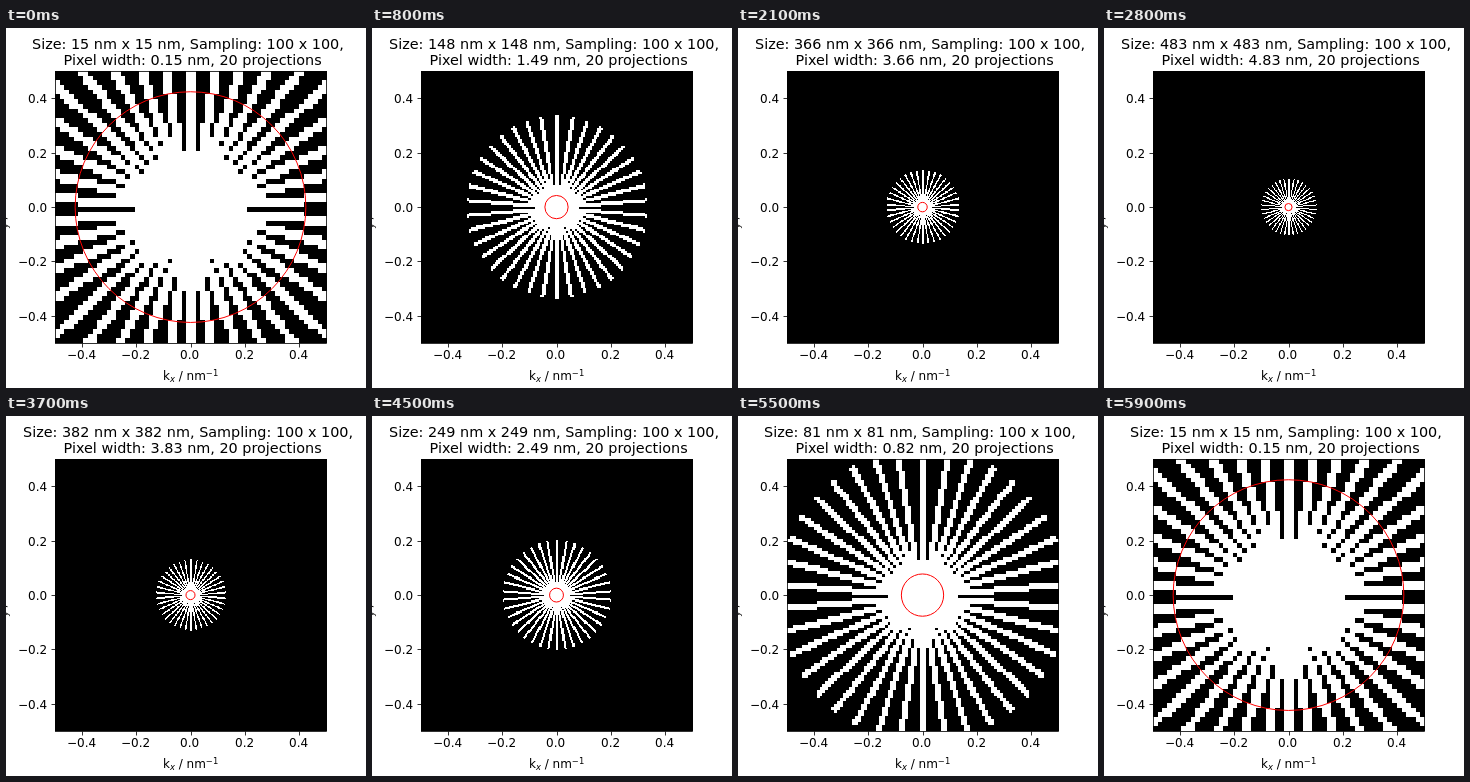
Write an HTML page with a canvas that moves like this. It is 360x360 px and loops after 6 s.

```html
<!DOCTYPE html>
<html lang="en">
<head>
<meta charset="utf-8">
<title>Fourier space coverage</title>
<style>
  html, body { margin: 0; width: 100%; height: 100%; overflow: hidden; background: #fff; }
  canvas { display: block; }
</style>
</head>
<body>
<canvas id="stage" width="360" height="360"></canvas>
<script>
const ctx = document.getElementById('stage').getContext('2d');

const SAMPLES = 100, PROJECTIONS = 20;
const STEP_MS = 100, STEPS = 30;
const AXES = { left: 48.6, top: 43.2, side: 271.8 };
const IMAGE = { left: 49, top: 43, side: 272 };
const CX = AXES.left + AXES.side / 2, CY = AXES.top + AXES.side / 2;

// Cells touched by a one-cell-wide line turned about the grid centre (bilinear footprint).
function buildCells() {
  const cells = [], half = (SAMPLES - 1) / 2, eps = 1e-6;
  const angles = Array.from({ length: PROJECTIONS }, (_, i) => i * Math.PI / (PROJECTIONS - 1));
  for (let row = 0; row < SAMPLES; row++) {
    for (let col = 0; col < SAMPLES; col++) {
      const x = col - half, y = row - half;
      const hit = angles.some(a => {
        const across = x * Math.cos(a) - y * Math.sin(a);
        const along = x * Math.sin(a) + y * Math.cos(a);
        return Math.abs(across + 0.5) < 1 - eps && Math.abs(along) <= half + eps;
      });
      if (hit) cells.push([col, row]);
    }
  }
  return cells;
}
const cells = buildCells();

// Text starts on a whole pixel; anchor is 0 for left, 0.5 for centre, 1 for right.
function text(str, x, y, size, anchor) {
  ctx.font = `${size}px "DejaVu Sans", sans-serif`;
  ctx.fillText(str, Math.floor(x - anchor * ctx.measureText(str).width), y);
}

// Draws k_axis / nm^-1 from a baseline start point.
function axisLabel(axis, x, y) {
  const parts = [['k', 12, 0], [axis, 8.4, 2, 'italic'], [' / nm', 12, 0], ['\u22121', 8.4, -4.5]];
  for (const [str, size, dy, style = ''] of parts) {
    ctx.font = `${style} ${size}px "DejaVu Sans", sans-serif`;
    ctx.fillText(str, x, y + dy);
    x += ctx.measureText(str).width;
  }
}

const snap = v => Math.floor(v + 0.5) + 0.5;

function drawAxes() {
  ctx.strokeStyle = ctx.fillStyle = '#000';
  ctx.lineWidth = 0.8;
  const x0 = snap(AXES.left), x1 = snap(AXES.left + AXES.side);
  const y0 = snap(AXES.top), y1 = snap(AXES.top + AXES.side);
  ctx.strokeRect(x0, y0, x1 - x0, y1 - y0);
  ctx.beginPath();
  for (let i = -2; i <= 2; i++) {
    const label = (i < 0 ? '\u2212' : '') + Math.abs(i * 0.2).toFixed(1);
    const x = CX + i * 0.2 * AXES.side, y = snap(CY - i * 0.2 * AXES.side);
    ctx.moveTo(snap(x), y1);
    ctx.lineTo(snap(x), y1 + 4);
    ctx.moveTo(x0, y);
    ctx.lineTo(x0 - 4, y);
    text(label, x, 331, 12, 0.5);
    text(label, 41.6, y + 4.5, 12, 1);
  }
  ctx.stroke();
  axisLabel('x', 157, 352);
  ctx.save();
  ctx.translate(0, 207);
  ctx.rotate(-Math.PI / 2);
  axisLabel('y', 0, 0);
  ctx.restore();
}

function drawMask(size) {
  const { left, top, side } = IMAGE;
  // Border cells added around the mask, or cut away when negative.
  const border = size < SAMPLES
    ? -Math.floor((SAMPLES - size) / 4)
    : Math.floor((size - SAMPLES) / 2);
  const cell = side / (SAMPLES + 2 * border);
  const edgeX = i => Math.round(left + (i + border) * cell);
  const edgeY = i => Math.round(top + (i + border) * cell);
  ctx.save();
  ctx.beginPath();
  ctx.rect(left, top, side, side);
  ctx.clip();
  ctx.fillStyle = '#000';
  ctx.fillRect(left, top, side, side);
  ctx.fillStyle = '#fff';
  for (const [col, row] of cells) {
    const x = edgeX(col), y = edgeY(row);
    ctx.fillRect(x, y, edgeX(col + 1) - x, edgeY(row + 1) - y);
  }
  ctx.restore();
}

function draw(step) {
  const size = 15 + step * 485 / (STEPS - 1);
  ctx.fillStyle = '#fff';
  ctx.fillRect(0, 0, 360, 360);
  drawMask(size);

  ctx.strokeStyle = '#f00';
  ctx.lineWidth = 1;
  ctx.beginPath();
  ctx.arc(CX, CY, PROJECTIONS / (Math.PI * size) * AXES.side, 0, 2 * Math.PI);
  ctx.stroke();

  drawAxes();
  const nm = Math.floor(size), hundredths = Math.round(size);
  const width = hundredths % 100 ? hundredths / 100 : (hundredths / 100).toFixed(1);
  text(`Size: ${nm} nm x ${nm} nm, Sampling: ${SAMPLES} x ${SAMPLES}, `, CX, 21, 14.4, 0.5);
  text(` Pixel width: ${width} nm, ${PROJECTIONS} projections`, CX, 37, 14.4, 0.5);
}

let shown = -1;
function tick() {
  const beat = Math.floor(performance.now() / STEP_MS) % (2 * STEPS);
  const step = Math.min(beat, 2 * STEPS - 1 - beat);
  if (step !== shown) draw(shown = step);
  requestAnimationFrame(tick);
}
tick();
</script>
</body>
</html>
```
